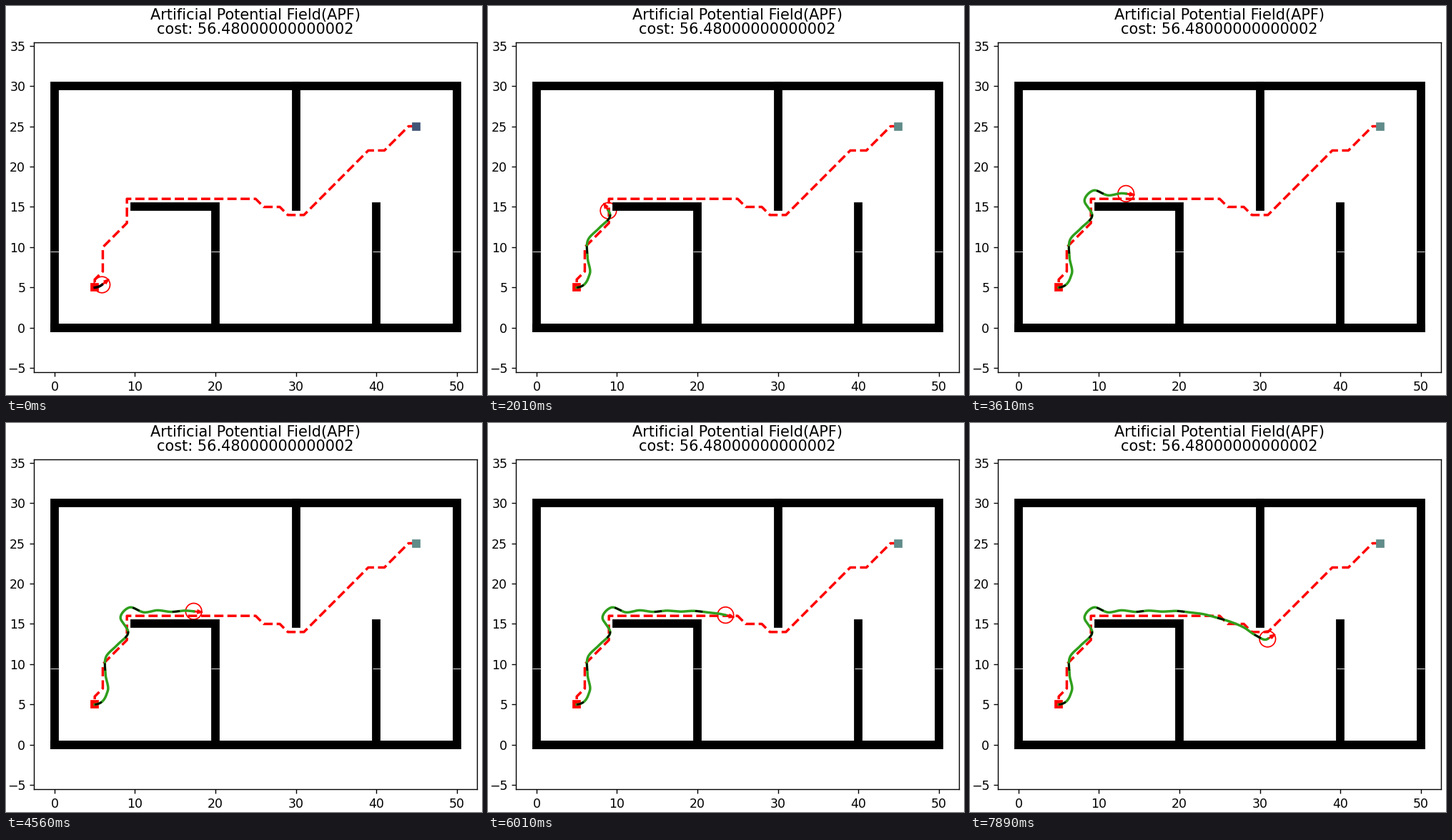
These frames come from a looping animation (666 px wide and 545 px high, 8 s). A matplotlib script:

```python
import numpy as np
import matplotlib.pyplot as plt
from matplotlib.animation import FuncAnimation

W, H, DPI = 666, 545, 125
LOOP, FRAMES, STEPS = 8000, 160, 60
DT = LOOP // FRAMES
FIRST, GAP = -1, 3  # step of the first key pose, steps between key poses

# corners of the planned path
PLAN = [(45, 25), (44, 25), (41, 22), (39, 22), (31, 14), (29, 14), (28, 15), (26, 15),
        (25, 16), (9, 16), (9, 13), (6, 10), (6, 7), (5, 6), (5, 5)]


def route():
    """Key poses: climb round the corner, a fading wiggle along the wall, a final hook."""
    climb = [(5, 5), (6.6, 6.65), (6.35, 8.65), (6.37, 10.83), (7.7, 12.3),
             (9.15, 13.9), (8.2, 15.8), (9.35, 17.05)]
    x = np.linspace(11.1, 28, 11)
    n = np.arange(x.size)
    y = 16.58 - .14 * (-1.0) ** n * np.exp(-n / 4) - .0247 * np.clip(x - 19, 0, None) ** 2
    return np.vstack([climb, np.column_stack([x, y]), [(29.45, 13.6), (30.95, 13.14)]])


P = route()
M = np.gradient(P, axis=0)
M[0], M[-1] = (3.6, .4), (1.4, .9)  # headings at both ends


def pose(k):
    """Cubic Hermite position at step k."""
    t = (np.atleast_1d(k) - FIRST) / GAP
    i = np.clip(t.astype(int), 0, len(P) - 2)
    u = (t - i)[:, None]
    return ((1 + 2 * u) * (1 - u) ** 2 * P[i] + u * (1 - u) ** 2 * M[i]
            + u * u * (3 - 2 * u) * P[i + 1] + u * u * (u - 1) * M[i + 1])


def wall(*points):
    ax.plot(*zip(*points), color="black", lw=6.8,
            solid_capstyle="projecting", solid_joinstyle="miter")


fig = plt.figure(figsize=(W / DPI, H / DPI), dpi=DPI, facecolor="white")
ax = fig.add_axes([39.4 / W, 32 / H, 619.5 / W, 462 / H])
ax.set_xlim(-2.53, 52.5)
ax.set_ylim(-5.49, 35.4)
ax.set_xticks(range(0, 51, 10))
ax.set_yticks(range(-5, 36, 5))
ax.set_title("Artificial Potential Field(APF)\ncost: 56.48000000000002",
             pad=6.8, linespacing=1.0)

wall((0, 0), (50, 0), (50, 30), (0, 30), (0, 0), (50, 0))
wall((10, 15), (20, 15), (20, 0))
wall((30, 15), (30, 30))
wall((40, 0), (40, 15))
for x in (0, 20, 40, 50):
    ax.plot([x - .5, x + .5], [9.5, 9.5], color="#d8d8d8", lw=.6, solid_capstyle="butt")

ax.plot(*zip(*PLAN), "--", color="#ff0000", lw=2)
ax.plot(5, 5, "s", color="#ff0000")
goal, = ax.plot(45, 25, "s")
trail, = ax.plot([], [], lw=2)
flecks, = ax.plot([], [], color="black", lw=1.5, ls=(0, (4, 18)))
circle = ax.add_patch(plt.Circle((0, 0), 1, color="r", fill=False))
arrow = ax.arrow(0, 0, .5, 0, width=.1, head_width=.4, color="r")


def update(i):
    k = int((i + .5) * STEPS / FRAMES)
    before, here = pose(np.array([k - .1, k]))
    dx, dy = .5 * (here - before) / np.hypot(*(here - before))
    circle.center = here
    arrow.set_data(x=here[0], y=here[1], dx=dx, dy=dy)

    pts = pose(np.linspace(FIRST, k, 8 * (k + 2))).T
    trail.set_data(*pts)
    flecks.set_data(*pts)
    trail.set_color("#2f9f1c" if k else "black")
    goal.set_color("#608c8a" if k else "#435577")
    return trail, flecks, goal, circle, arrow


anim = FuncAnimation(fig, update, frames=FRAMES, interval=DT, repeat=True,
                     repeat_delay=0, blit=False)
plt.show()
```
